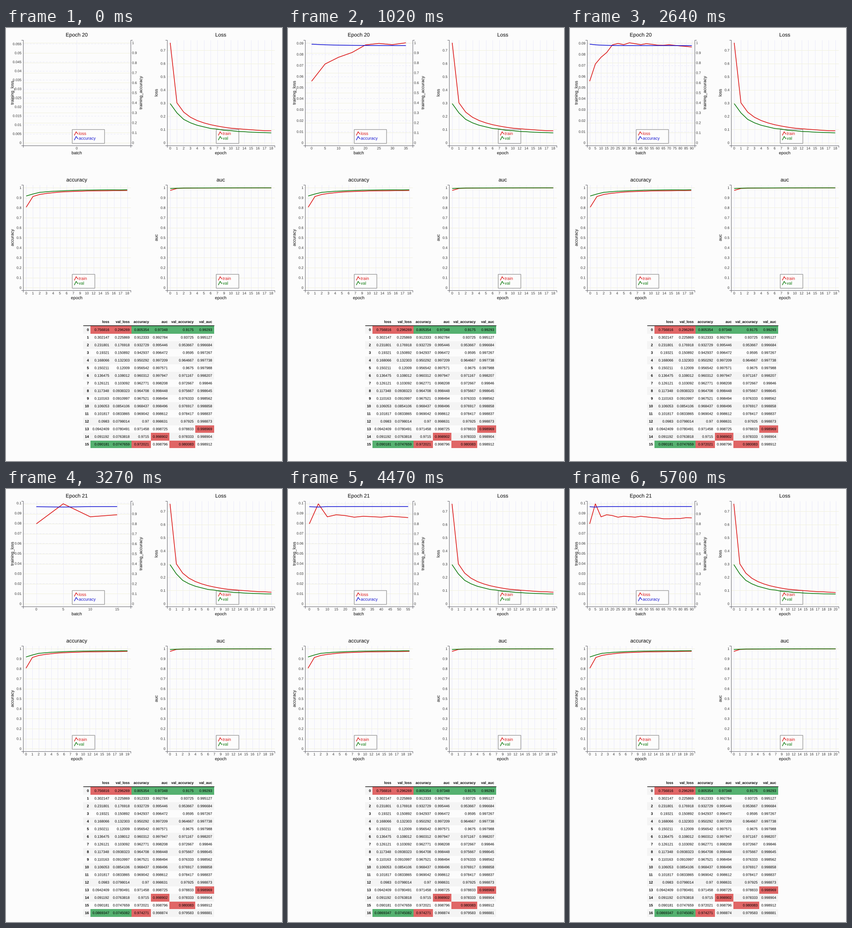
A matplotlib script for the animation above (5.73 s loop, 598 by 936 pixels).

```python
import numpy as np
import matplotlib.pyplot as plt
from matplotlib.animation import FuncAnimation
from matplotlib.collections import LineCollection, PolyCollection
from matplotlib.lines import Line2D
from matplotlib.patches import PathPatch, Rectangle
from matplotlib.path import Path
from matplotlib.textpath import TextPath

W, H, DPI = 598, 936, 64
PX = 72 / DPI  # one pixel in points
FRAME_MS, FRAMES = 30, 191

STEP_MS = 136       # time per plotted batch
LAST_BATCH = 18
EPOCH_MS = 2850     # start of the second epoch
CURVES_MS = 2760    # validation results reach the curves

PAPER, INK, TICK, AXIS = "#fcfcfc", "#000000", "#333333", "#6a6a72"
RED, GREEN, BLUE = "#dc1414", "#0a780a", "#1414d2"
BEIGE, LAVENDER = "#f1f1de", "#ebebfa"
HIGH, LOW, STRIPE = "#e06666", "#55b170", "#f4f4f4"

EPOCHS = [*range(8), 9, 10, 12, *range(14, 21)]
HISTORY = {
    "loss": [0.756816, 0.302147, 0.231801, 0.19321, 0.168066, 0.150211,
             0.136475, 0.126121, 0.117348, 0.110163, 0.106053, 0.101817,
             0.0983, 0.0942409, 0.091192, 0.090181, 0.0869347, 0.085],
    "val_loss": [0.296269, 0.225869, 0.176918, 0.150892, 0.132303, 0.12009,
                 0.108012, 0.103092, 0.0938323, 0.0910997, 0.0854106,
                 0.0833865, 0.0798014, 0.0780491, 0.0763818, 0.0747659,
                 0.0745082, 0.0733],
    "accuracy": [0.805354, 0.912333, 0.932729, 0.942937, 0.950292, 0.956542,
                 0.960312, 0.962771, 0.964708, 0.967521, 0.968437, 0.969042,
                 0.97, 0.971458, 0.9715, 0.972021, 0.974271, 0.9746],
    "auc": [0.97348, 0.992784, 0.995446, 0.996472, 0.997209, 0.997571,
            0.997947, 0.998208, 0.998448, 0.998494, 0.998496, 0.998612,
            0.998631, 0.998725, 0.998902, 0.998796, 0.998874, 0.9989],
    "val_accuracy": [0.9175, 0.93725, 0.953667, 0.9595, 0.964667, 0.9675,
                     0.971167, 0.972667, 0.975667, 0.976333, 0.976917,
                     0.978417, 0.97925, 0.978833, 0.978333, 0.980083,
                     0.979583, 0.9803],
    "val_auc": [0.99293, 0.995127, 0.996684, 0.997267, 0.997738, 0.997988,
                0.998207, 0.99846, 0.998645, 0.998562, 0.998858, 0.998837,
                0.998873, 0.998969, 0.998904, 0.998912, 0.998881, 0.9989],
}
BATCH_LOSS = {
    20: [.05564, .0712, .0773, .0816, .0885, .0898, .0887, .0904, .0896, .0887,
         .0896, .0890, .0883, .0882, .0887, .0881, .0875, .0871, .0866],
    21: [.0794, .0993, .0864, .0884, .0876, .0860, .0869, .0865, .0860, .0869,
         .0863, .0856, .0853, .0844, .0844, .0847, .0847, .0855, .0853],
}
n = np.arange(LAST_BATCH + 1)
BATCH_ACC = {
    20: 0.972 + 0.014 * np.exp(-n / 1.8),
    21: 0.973 - 0.002 * np.exp(-n / 3) - 0.004 * (n == 1),
}

fig = plt.figure(figsize=(W / DPI, H / DPI), dpi=DPI, facecolor=PAPER)
ax = fig.add_axes([0, 0, 1, 1], xlim=(0, W), ylim=(H, 0))
ax.axis("off")
artists, words, outlines, advances = [], {}, {}, {}


def add(artist):
    # add_artist skips the slow data-limit update
    artists.append(ax.add_artist(artist))


def advance(ch, size, weight):
    """Pen advance of one character, measured against a trailing bar."""
    key = ch, size, weight
    if key not in advances:
        prop = dict(family="Liberation Sans", weight=weight)
        ends = [TextPath((0, 0), s, size=size, prop=prop).vertices[:, 0].max()
                for s in (ch + "|", "|")]
        advances[key] = ends[0] - ends[1]
    return advances[key]


def outline(s, size, weight):
    key = s, size, weight
    if key not in outlines:
        path = TextPath((0, 0), s, size=size,
                        prop=dict(family="Liberation Sans", weight=weight))
        width = sum(advance(ch, size, weight) for ch in s)
        outlines[key] = path.vertices, path.codes, width
    return outlines[key]


def text(s, x, y, size, align=0.5, color=INK, weight="normal", upright=False):
    verts, codes, width = outline(s, size, weight)
    tx, ty = verts[:, 0] - align * width, verts[:, 1]
    xy = (x - ty, y - tx) if upright else (x + tx, y - ty)
    words.setdefault(color, []).append((np.column_stack(xy), codes))


def flush_text():
    for color, parts in words.items():
        verts, codes = (np.concatenate(p) for p in zip(*parts))
        add(PathPatch(Path(verts, codes), fc=color, lw=0, zorder=5, snap=False))
    words.clear()


def lines(segs, color, width=1.0, z=1, style="solid"):
    add(LineCollection(segs, colors=color, linewidths=width * PX,
                       linestyles=style, zorder=z))


def curve(xs, ys, color, width=1.5):
    add(Line2D(xs, ys, color=color, lw=width * PX, zorder=4,
               solid_joinstyle="miter", solid_capstyle="butt"))


def cells(rects, color, z):
    """Filled boxes given as (x0, y0, x1, y1)."""
    add(PolyCollection([[(a, b), (c, b), (c, d), (a, d)] for a, b, c, d in rects],
                       facecolors=color, linewidths=0, zorder=z))


def ticks(top):
    raw = top / 10
    power = 10 ** np.floor(np.log10(raw))
    err = raw / power
    step = power * (10 if err >= 50 ** .5 else 5 if err >= 10 ** .5
                    else 2 if err >= 2 ** .5 else 1)
    return np.arange(0, top * 222 / 216, step)


def chart(x, y, title, xlabel, ylabel, labels, series, top, right=None):
    """series: (name, values, colour, top of its axis)."""
    x0, x1, y0, y1 = x + 36.5, x + 270, y + 26, y + 254
    zero, height = y + 248, 216
    mid = (x0 + x1) / 2
    xs = x0 + (np.arange(len(labels)) + 0.5) * (x1 - x0) / len(labels)

    def level(v, peak):
        return zero - np.asarray(v) * height / peak

    lines([[(t, y0), (t, y1)] for t in xs], LAVENDER)
    sides = [(top, x0, -1, LAVENDER if right else BEIGE, ylabel, x + 16.5)]
    if right:
        sides.append((1, x1, 1, BEIGE, right, x + 295))
    for peak, edge, way, color, name, label_x in sides:
        values = ticks(peak)
        rows = level(values, peak)
        dashed = right and way < 0
        lines([[(x0, r), (x1, r)] for r in rows], color,
              style=(0, (4, 3)) if dashed else "solid")
        for v, r in zip(values, rows):
            text(f"{v:.6g}", edge + way * 3, r + 2.7, 7.6, way < 0, TICK)
        tip = edge + way * 3.5
        lines([[(tip, y0), (edge, y0), (edge, y1), (tip, y1)]], AXIS, z=2)
        text(name, label_x, y + 140, 9.2, upright=True)
    lines([[(x0, y1 + 3.5), (x0, y1), (x1, y1), (x1, y1 + 3.5)]], AXIS, z=2)
    for t, label in zip(xs, labels):
        text(str(label), t, y + 262.5, 7.6, color=TICK)
    text(title, mid, y + 18.5, 11.3)
    text(xlabel, mid, y + 273, 9.2)

    left = x + 143
    add(Rectangle((left, y + 219), 69.5 if right else 48.5, 30, fc=PAPER,
                  ec="#999999", lw=1.3 * PX, zorder=3))
    for i, (name, values, color, peak) in enumerate(series):
        base = y + 231.2 + 10.2 * i
        curve(left + np.array([5, 9, 13]), base + np.array([1, -7, -1.5]), color, 1.3)
        text(name, left + 14.5, base, 9.2, 0, color)
        curve(xs, level(values, peak), color)


def table(count):
    edges = [167, 183.4, 227.6, 271.8, 313.7, 354.1, 410.4, 450.5]
    top, pitch, pad, size = 644, 16.5, 3.85, 7.7
    ys = top + pitch * np.arange(count)
    cells([(edges[0], y, edges[-1], y + pitch) for y in ys[::2]], STRIPE, 1)
    for r, y in enumerate(ys):
        text(str(r), edges[1] - pad, y + 10.9, size, 1, weight="bold")
    marks = {HIGH: [], LOW: []}
    for (name, column), a, b in zip(HISTORY.items(), edges[1:], edges[2:]):
        values = column[:count]
        text(name, b - pad, 637.6, size, 1, weight="bold")
        for pick, color in ((max, HIGH), (min, LOW)):
            y = ys[values.index(pick(values))]
            marks[color].append((a, y, b, y + pitch))
        for v, y in zip(values, ys):
            text(f"{v:.6g}", b - pad, y + 10.9, size, 1)
    for color, rects in marks.items():
        cells(rects, color, 2)
    lines([[(edges[0], 643), (edges[-1], 643)]], INK, 1.2, z=3)


def state(i):
    t = i * FRAME_MS
    second = t >= EPOCH_MS
    batch = min((t - second * EPOCH_MS) // STEP_MS, LAST_BATCH)
    seen = 16 + (t >= CURVES_MS) + (t >= EPOCH_MS + CURVES_MS)
    return 20 + second, batch + 1, seen, 16 + second


shown = None


def draw(i):
    global shown
    now = state(i)
    if now == shown:
        return
    shown = now
    epoch, batches, seen, rows = now
    while artists:
        artists.pop().remove()

    loss = BATCH_LOSS[epoch][:batches]
    chart(0, 0, f"Epoch {epoch}", "batch", "training_loss",
          range(0, 5 * batches, 5),
          [("loss", loss, RED, max(loss)),
           ("accuracy", BATCH_ACC[epoch][:batches], BLUE, 1)],
          max(loss), "training_accuracy")
    for x, y, title, name in ((312, 0, "Loss", "loss"),
                              (0, 313.3, "accuracy", "accuracy"),
                              (312, 313.3, "auc", "auc")):
        top = HISTORY["loss"][0] if name == "loss" else 1
        chart(x, y, title, "epoch", name, EPOCHS[:seen],
              [("train", HISTORY[name][:seen], RED, top),
               ("val", HISTORY["val_" + name][:seen], GREEN, top)], top)
    table(rows)
    flush_text()


anim = FuncAnimation(fig, draw, frames=FRAMES, interval=FRAME_MS,
                     init_func=lambda: draw(0), repeat=True, repeat_delay=0,
                     blit=False)
plt.show()
```
